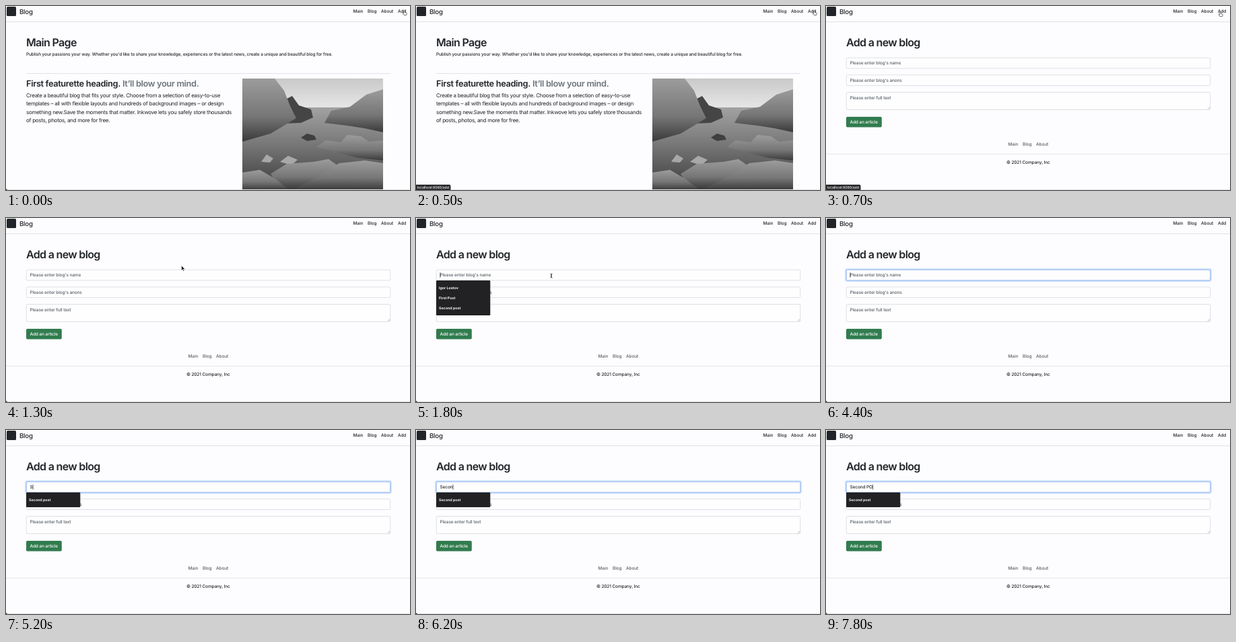
Write an HTML page that moves like this. It is 600 by 274 pixels and loops after 8000 ms.

```html
<!DOCTYPE html>
<html lang="en">
<head>
<meta charset="utf-8">
<title>Blog</title>
<style>
html, body { margin: 0; width: 100%; height: 100%; overflow: hidden; background: #fdfcfe; }
svg { display: block; width: 600px; height: 274px; }
text { font: 500 6.5px Inter, "Noto Sans", sans-serif; letter-spacing: -.018em; fill: #212529; text-rendering: geometricPrecision; }
.brand { font-size: 9.7px; letter-spacing: -.025em; }
.h1 { font-size: 16px; font-weight: 600; letter-spacing: -.042em; }
.h2 { font-size: 12.8px; font-weight: 600; letter-spacing: -.028em; }
.lead { font-size: 8px; font-weight: 400; letter-spacing: -.034em; }
.muted { fill: #6c757d; }
.hint { fill: #596067; }
.mid { text-anchor: middle; }
.item { font-size: 5.3px; font-weight: 700; letter-spacing: 0; fill: #f4f4f4; }
.status { font-size: 5.2px; fill: #eee; }
.rule { fill: #dcdce0; }
.field { fill: #fefefe; stroke: #ced4da; stroke-width: .7; }
</style>
</head>
<body>
<svg viewBox="0 0 600 274">
  <rect width="600" height="274" fill="#fdfcfe"/>
  <rect x="1" y="1" width="14" height="14" rx="1.5" fill="#212529"/>
  <text class="brand" x="20" y="11.6">Blog</text>
  <g id="nav">
    <text x="515.5" y="10.4">Main</text>
    <text x="537" y="10.4">Blog</text>
    <text x="557" y="10.4">About</text>
    <text x="582" y="10.4">Add</text>
  </g>
  <rect class="rule" y="23" width="600" height=".8"/>

  <g id="home">
    <text class="h1" x="30" y="59.7">Main Page</text>
    <text x="30" y="74.2">Publish your passions your way. Whether you'd like to share your knowledge, experiences or the latest news, create a unique and beautiful blog for free.</text>
    <rect class="rule" x="30" y="100" width="541" height=".8"/>
    <text class="h2" x="30" y="120">First featurette heading.</text>
    <text class="h2 muted" x="173" y="120">It’ll blow your mind.</text>
    <text class="lead" x="30" y="135.8">Create a beautiful blog that fits your style. Choose from a selection of easy-to-use</text>
    <text class="lead" x="30" y="148.3">templates – all with flexible layouts and hundreds of background images – or design</text>
    <text class="lead" x="30" y="160.8">something new.Save the moments that matter. Inkwove lets you safely store thousands</text>
    <text class="lead" x="30" y="173.3">of posts, photos, and more for free.</text>
    <svg x="351" y="108" width="209" height="166" viewBox="0 0 209 166">
      <defs>
        <linearGradient id="sky" x2="0" y2="1"><stop stop-color="#c9c9c9"/><stop offset="1" stop-color="#e6e6e6"/></linearGradient>
        <linearGradient id="sea" x2="0" y2="1"><stop stop-color="#a2a2a2"/><stop offset=".4" stop-color="#7c7c7c"/><stop offset="1" stop-color="#3c3c3c"/></linearGradient>
        <linearGradient id="rock" x2="0" y2="1"><stop stop-color="#9c9c9c"/><stop offset=".6" stop-color="#767676"/><stop offset="1" stop-color="#3a3a3a"/></linearGradient>
      </defs>
      <rect width="209" height="44" fill="url(#sky)"/>
      <rect y="43" width="209" height="123" fill="url(#sea)"/>
      <path d="M62 32l12-6 10 14 18 6 3 12-18 8-25 1z" fill="#454545"/>
      <path d="M0 0h48l14 18 9 23 9 18-18 11-20 12-42 12z" fill="url(#rock)"/>
      <path d="M122 66l10-18 28-6 24-18 25-8v64l-28-6-26-4z" fill="url(#rock)"/>
      <path d="M87 88l9-6 11 3 3 6-14 2z" fill="#3f3f3f"/>
      <path d="M110 102l14-10 22 3 10-11 20 2 12 8 21-2v30l-38-4-30-8z" fill="url(#rock)"/>
      <path d="M28 124l8-11 10 6-5 6zM56 124l12-9 14 6-9 8z" fill="#a8a8a8"/>
      <path d="M42 142l24-15 40-3 22-4 20 14-18 14-40 12-34 4z" fill="url(#rock)"/>
      <path d="M0 140l26-4 24 14 20 16H0z" fill="url(#rock)"/>
      <path d="M72 166l30-14 42-26 38-4 27 4v40z" fill="url(#rock)"/>
    </svg>
  </g>

  <g id="form">
    <text class="h1" x="30" y="59.7">Add a new blog</text>
    <rect id="glow" x="29.2" y="76.2" width="542.6" height="17.6" rx="2.4" fill="none" stroke="#0d6efd" stroke-opacity=".25" stroke-width="1.7"/>
    <rect class="field" x="30.3" y="77.2" width="540.4" height="15.6" rx="1.7"/>
    <rect id="focus" x="30.3" y="77.2" width="540.4" height="15.6" rx="1.7" fill="none" stroke="#86b7fe" stroke-width=".7"/>
    <rect class="field" x="30.3" y="102.8" width="540.4" height="15.6" rx="1.7"/>
    <rect class="field" x="30.3" y="128.5" width="540.4" height="25.9" rx="1.7"/>
    <path d="M567 153.5l3-3M569 153.5l1-1" stroke="#777" stroke-width=".5"/>
    <text id="hint" class="hint" x="35.5" y="87.3">Please enter blog's name</text>
    <text class="hint" x="35.5" y="113.1">Please enter blog's anons</text>
    <text class="hint" x="35.5" y="138.8">Please enter full text</text>
    <text id="typed" x="35.5" y="87.3"></text>
    <rect id="caret" y="81.3" width=".7" height="7.4" fill="#111"/>
    <rect x="30" y="165" width="52.8" height="15.5" rx="1.7" fill="#317c4e"/>
    <text x="35.5" y="175" style="fill:#fff">Add an article</text>
    <text class="hint" x="270.5" y="208">Main</text>
    <text class="hint" x="292" y="208">Blog</text>
    <text class="hint" x="312" y="208">About</text>
    <rect class="rule" y="220.3" width="600" height=".7"/>
    <text class="mid" x="300.3" y="235">© 2021 Company, Inc</text>
    <g id="list">
      <rect id="panel" x="30" y="93" width="80.3" rx="1" fill="#222224"/>
      <text id="first" class="item" x="34" y="106"></text>
      <g id="rest">
        <text class="item" x="34" y="121">First Post</text>
        <text class="item" x="34" y="136">Second post</text>
      </g>
    </g>
  </g>

  <rect y="273" width="600" height="1" fill="#e3e2e5"/>
  <path d="M0 272v2h2z" fill="#222"/>
  <g id="status">
    <path d="M0 266h49.5q2 0 2 2v6H0z" fill="#2c2c2e"/>
    <text class="status" x="1.8" y="272.1">localhost:8080/add</text>
  </g>
  <g id="hand"><path d="M-1.2-3.2q.9-.7 1.5.2v2.4l2.4.7q.8.4.5 1.4l-.7 2.1h-3.4l-1.9-2.4q-.2-1 1.6-.2z" fill="#fff" stroke="#111" stroke-width=".6"/></g>
  <g id="arrow"><path d="M0-3.5v7l1.7-1.5 1.2 2.6 1.1-.5-1.2-2.5h2.3z" fill="#111" stroke="#fff" stroke-width=".5"/></g>
  <g id="beam"><path d="M-1.5-3q1.5 0 1.5 1v4q0 1-1.5 1M1.5-3q-1.5 0-1.5 1v4q0 1 1.5 1" fill="none" stroke="#222" stroke-width=".8"/></g>
</svg>
<script>
const LOOP = 8000;
const $ = id => document.getElementById(id);
const show = (id, on) => $(id).style.display = on ? '' : 'none';
const clamp = v => Math.min(1, Math.max(0, v));

// Field contents, each from the given time on
const edits = [
  [1700, ''], [3000, 'S'], [3200, 'Se'], [3400, 'Sec'], [3700, 'Seco'], [3900, 'Secon'],
  [4200, 'Sec'], [4300, 'S'], [4400, ''], [5100, 'S'], [5600, 'Se'], [5800, 'Sec'],
  [6000, 'Seco'], [6200, 'Secon'], [6500, 'Second'], [7000, 'Second '],
  [7600, 'Second P'], [7800, 'Second PO']
];

function drawPointer(t) {
  const k = clamp((t - 700) / 800);
  const ease = k * k * (3 - 2 * k);
  const x = t < 700 ? 592 : 586 - 385 * ease;
  const y = t < 700 ? 10 : 12 + 74 * ease;
  const kind = t >= 3000 ? '' : t < 900 ? 'hand' : t < 1500 ? 'arrow' : 'beam';
  for (const id of ['hand', 'arrow', 'beam']) show(id, id === kind);
  if (kind) $(kind).setAttribute('transform', `translate(${x} ${y})`);
}

function drawField(t) {
  const [at, text] = edits.findLast(e => e[0] <= t) || [LOOP, ''];
  const typed = $('typed');
  const value = text.replaceAll(' ', '\u00a0');
  if (typed.textContent !== value) typed.textContent = value;
  show('hint', !text);
  show('caret', t >= at && (t - at) % 1000 < 500);
  $('caret').setAttribute('x', 35.6 + (text ? typed.getComputedTextLength() : 0));

  const all = t >= 1700 && t < 3000;
  show('list', all || text);
  show('rest', all);
  $('panel').setAttribute('height', all ? 52 : 22);
  $('first').textContent = all ? 'Igor Lestov' : 'Second post';

  const lit = clamp((t - 1800) / 150);
  $('glow').style.opacity = $('focus').style.opacity = lit;
}

function draw(t) {
  show('home', t < 700);
  show('form', t >= 700);
  show('status', t >= 100 && t < 1300);
  $('status').style.opacity = clamp((t - 50) / 100) * clamp((1300 - t) / 200);
  drawField(t);
  drawPointer(t);
}

const start = performance.now();
(function tick() {
  draw((performance.now() - start) % LOOP);
  requestAnimationFrame(tick);
})();
</script>
</body>
</html>
```
